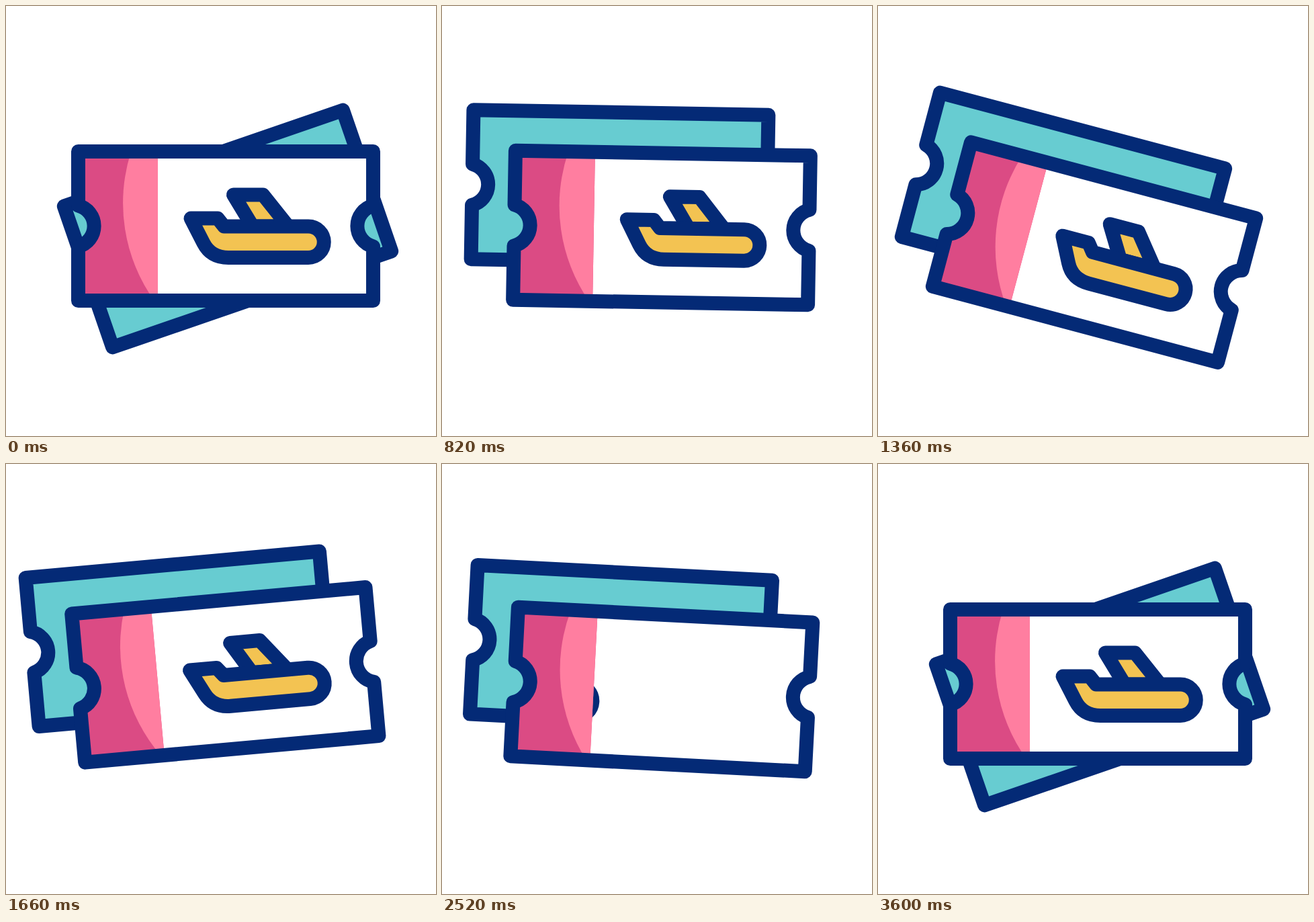
These frames come from a looping animation (640 by 640 pixels, 3620 ms). An HTML page:

```html
<!DOCTYPE html>
<html lang="en">
<head>
<meta charset="utf-8">
<title>Plane tickets</title>
<style>
  html, body { margin: 0; width: 100%; height: 100%; overflow: hidden; background: #fff; }
  svg { display: block; width: 100%; height: 100%; }
  .line { stroke: #042a76; stroke-width: 21; stroke-linejoin: round; }
</style>
</head>
<body>
<svg viewBox="0 0 640 640">
  <defs>
    <path id="ticket" d="M-219.5-111H219.5V-30.5A31.5 31.5 0 0 0 219.5 30.5V111H-219.5V30.5A31.5 31.5 0 0 0-219.5-30.5Z"/>
    <clipPath id="inside"><use href="#ticket" x="327" y="327.5"/></clipPath>
  </defs>
  <g id="tickets">
    <use id="back" href="#ticket" class="line" fill="#67ccd1"/>
    <use href="#ticket" x="327" y="327.5" fill="#fff"/>
    <g clip-path="url(#inside)">
      <g id="plane" class="line" fill="#f3c352">
        <path d="M338.5 281H382.5L420 328H367Z"/>
        <path d="M275 316H315L324.5 328H450a23.25 23.25 0 0 1 0 46.5H331Q305 374.5 294 353Z"/>
      </g>
      <path d="M107 216H226V440H107Z" fill="#db4b84"/>
      <path d="M186 217A250 250 0 0 0 221 439H226V217Z" fill="#ff7ea0"/>
    </g>
    <use href="#ticket" x="327" y="327.5" class="line" fill="none"/>
  </g>
</svg>
<script>
const STEP = 20, LOOP = 3620;
const [tickets, back, plane] = ['tickets', 'back', 'plane'].map(id => document.getElementById(id));

const smooth = u => u * u * (3 - 2 * u);

// cubic-bezier(.4, 0, .4, 1)
function swing(u) {
  let lo = 0, hi = 1;
  for (let i = 0; i < 24; i++) {
    const s = (lo + hi) / 2;
    const x = 1.2 * s * (1 - s) + s ** 3;
    if (x < u) lo = s; else hi = s;
  }
  return smooth(lo);
}

// Keys are [step, value] pairs; two keys on one step make a jump.
function track(step, keys, ease) {
  if (step <= keys[0][0]) return keys[0][1];
  for (let i = 1; i < keys.length; i++) {
    const [a, from] = keys[i - 1], [b, to] = keys[i];
    if (step < b) return from + (to - from) * ease((step - a) / (b - a));
  }
  return keys[keys.length - 1][1];
}

const tilt = [[36, 0], [67, 15], [90.5, -8], [115.5, 4], [150.5, 0]];
const flight = [[97, 0], [120, 277], [120, -277], [150, 0]];
const closed = [[10, 1], [37, 0], [148, 0], [180, 1]];

function draw(now) {
  const step = Math.floor((now % LOOP) / STEP);
  const shut = track(step, closed, smooth);
  tickets.setAttribute('transform', `rotate(${track(step, tilt, swing)} 175 328)`);
  plane.setAttribute('transform', `translate(${track(step, flight, swing)})`);
  back.setAttribute('transform',
    `translate(${263.5 + 66.5 * shut} ${268 + 63.5 * shut}) rotate(${-19 * shut})`);
}

const start = performance.now();
function tick() {
  draw(performance.now() - start);
  requestAnimationFrame(tick);
}
tick();
</script>
</body>
</html>
```
